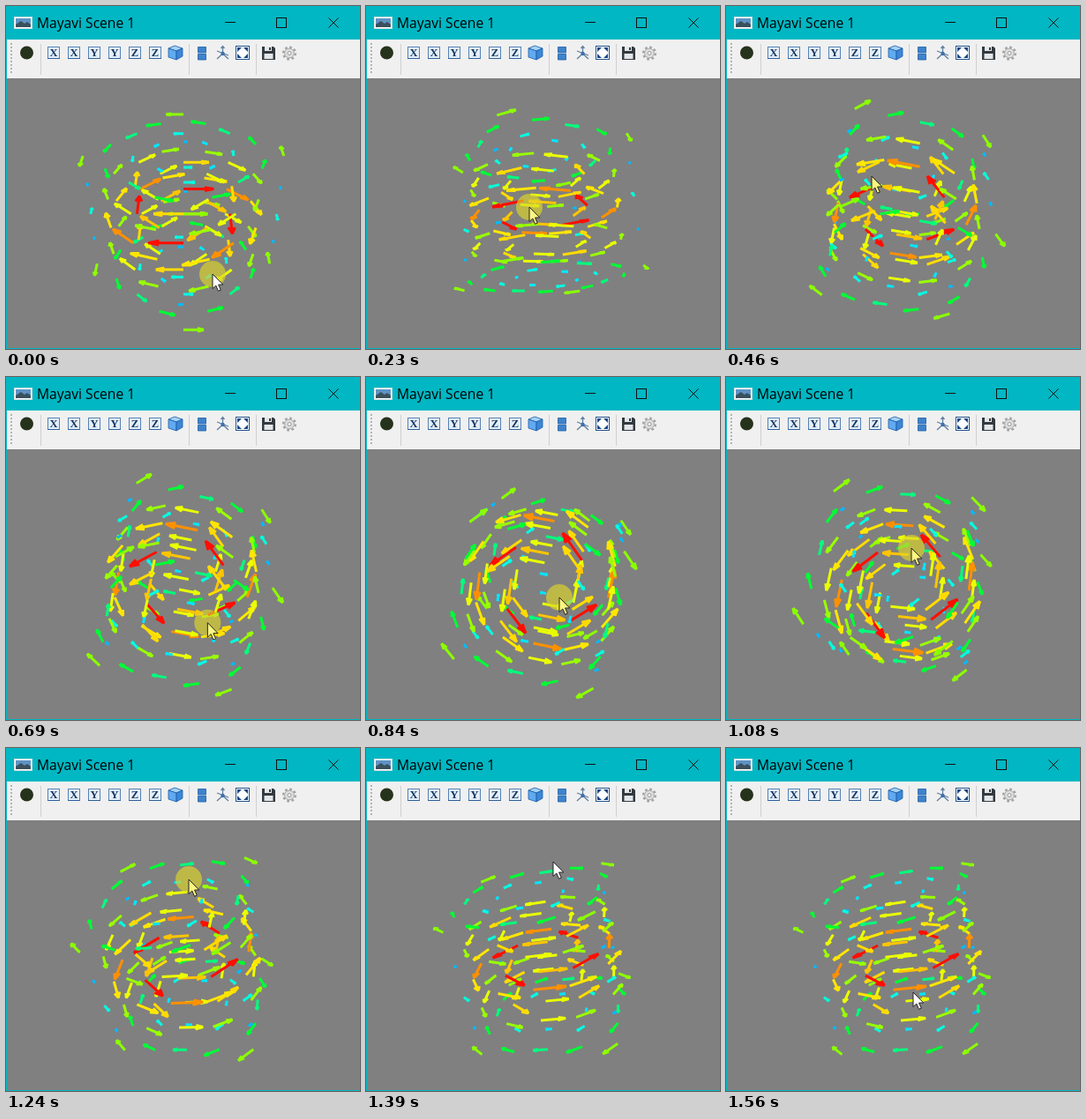
An HTML page with a canvas for the animation above (1.62 s loop, 401 by 389 pixels).

```html
<!DOCTYPE html>
<html lang="en">
<head>
<meta charset="utf-8">
<title>Mayavi Scene 1</title>
<style>
  html, body { margin: 0; width: 100%; height: 100%; overflow: hidden; }
  body { position: relative; background: #808080; }
  svg, canvas { position: absolute; left: 0; top: 0; display: block; }
  .title { font: 15.6px "Open Sans", "Noto Sans", sans-serif; fill: #000; }
  .axis { font: bold 12.5px "Liberation Serif", "Noto Serif", serif; fill: #16365f; text-anchor: middle; }
</style>
</head>
<body>
<canvas id="scene" width="401" height="389"></canvas>
<svg width="401" height="389" viewBox="0 0 401 389">
  <path fill="#00b7c3" d="M0 0H401V38H1V388H401V389H0Z"/>
  <path fill="#f0f0f0" d="M1 38H401V82H1Z"/>

  <g id="window-icon">
    <rect x="9.5" y="12.5" width="20" height="13" fill="#fff" stroke="#d5dde0"/>
    <rect x="11" y="14" width="17" height="10" fill="#5f93c4"/>
    <path fill="#39505c" d="M11 24V21L17 17 21 20 24 18 28 21V24Z"/>
  </g>
  <text class="title" x="35" y="25">Mayavi Scene 1</text>
  <g fill="none" stroke="#111">
    <path d="M248 18.5H260M365.500 13.500L376.500 24.500M376.500 13.500L365.500 24.500"/>
    <rect x="306.5" y="13.5" width="11" height="11"/>
  </g>

  <path stroke="#b4b4b4" stroke-width="2" stroke-dasharray="2 2" d="M6 42V78"/>
  <path stroke="#cfcfcf" d="M39.5 43V78M207.5 43V78M283.5 43V78"/>
  <circle cx="23.5" cy="53" r="7.5" fill="#26331c"/>
  <g id="axes"></g>

  <g stroke="#1c5da8" stroke-width=".8" stroke-linejoin="round">
    <path fill="#a4d2fa" d="M184 48L191 45 200 48 193 51Z"/>
    <path fill="#62aaf0" d="M184 48L193 51V61L184 58Z"/>
    <path fill="#3a86d8" d="M193 51L200 48V57L193 61Z"/>
    <rect x="217.5" y="46.5" width="9" height="6.5" fill="#3f83cc"/>
    <rect x="217.5" y="54.5" width="9" height="6.5" fill="#3f83cc"/>
  </g>

  <path fill="none" stroke="#5f7f9f" stroke-width="1.3"
    d="M245.500 46V54L239 60M245.500 54L252 60M239 51L252 56M243.500 48L245.500 45.500 247.500 48"/>
  <circle cx="245.5" cy="54" r="2.2" fill="#3c6fae"/>

  <rect x="260.5" y="45.5" width="15" height="15" fill="#fff" stroke="#23528c"/>
  <path fill="#17467f" d="M262 47H267L262 52ZM274 47V52L269 47ZM262 59V54L267 59ZM274 59H269L274 54Z"/>

  <path fill="#333a40" d="M290 46H303L305 48V61H290Z"/>
  <path fill="#e4e7ea" d="M293 46H301V51H293ZM292.500 54H302.500V60H292.500Z"/>
  <path fill="#333a40" d="M298 47H300V50H298Z"/>

  <circle cx="321" cy="53.5" r="6.8" fill="none" stroke="#a2a2a2" stroke-width="2.5" stroke-dasharray="2.67 2.67"/>
  <circle cx="321" cy="53.5" r="5.4" fill="#dedede" stroke="#a8a8a8"/>
  <circle cx="321" cy="53.5" r="2" fill="#f4f4f4" stroke="#999"/>
</svg>
<script>
  const LOOP = 1620, STEPS = 21;
  const CX = 201, CY = 235.8, FOCAL = 566, DIST = 15.22;
  const TURN_X = .5, TURN_Y = .684; // degrees per dragged pixel
  const ctx = document.getElementById('scene').getContext('2d');

  document.getElementById('axes').innerHTML = [...'XXYYZZ'].map((ch, i) => {
    const x = 54 + i * 23;
    return `<rect x="${x - 6.5}" y="46.5" width="13" height="13" fill="#e4effa" stroke="#5583b5"/>
      <path stroke="#2d5f9a" d="M${x - 7} 59.5H${x + 7}"/>
      <text class="axis" x="${x}" y="57">${ch}</text>`;
  }).join('');

  // Pointer path: two drags that turn the scene, each followed by a free move
  const PATH = [
    { step: 0, x: 234, y: 304, drag: true },
    { step: 3, x: 185, y: 228, drag: true },
    { step: 6, x: 165, y: 193 },
    { step: 8, x: 233, y: 293, drag: true },
    { step: 11, x: 219, y: 250, drag: true },
    { step: 14, x: 210, y: 194, drag: true },
    { step: 16, x: 207, y: 149, drag: true },
    { step: 18, x: 212, y: 129 },
    { step: 20, x: 212, y: 277 }
  ];

  // World axes as (right, up, towards viewer), seen isometrically
  const h = Math.SQRT1_2, s3 = Math.sqrt(1 / 3), s6 = Math.sqrt(1 / 6);
  const ISOMETRIC = [[-h, -s6, s3], [h, -s6, s3], [0, 2 * s6, s3]];

  // Trackball: the front of the scene follows the pointer
  function turn(axes, dx, dy) {
    const yaw = dx * TURN_X, pitch = -dy * TURN_Y;
    const size = Math.hypot(yaw, pitch);
    if (!size) return axes;
    const kx = -pitch / size, ky = yaw / size;
    const sin = Math.sin(size * Math.PI / 180), cos = Math.cos(size * Math.PI / 180);
    return axes.map(([x, y, n]) => {
      const along = (kx * x + ky * y) * (1 - cos);
      return [
        x * cos + ky * n * sin + kx * along,
        y * cos - kx * n * sin + ky * along,
        n * cos + (kx * y - ky * x) * sin
      ];
    });
  }

  function stateAt(step) {
    let axes = ISOMETRIC, x, y, drag;
    for (let i = 0; i < PATH.length - 1 && PATH[i].step <= step; i++) {
      const p = PATH[i], q = PATH[i + 1];
      const k = Math.min(1, (step - p.step) / (q.step - p.step));
      const dx = (q.x - p.x) * k, dy = (q.y - p.y) * k;
      x = p.x + dx;
      y = p.y + dy;
      drag = p.drag;
      if (drag) axes = turn(axes, dx, dy);
    }
    return { axes, x, y, drag };
  }

  // Blue-to-red hue ramp with square-root brightening
  function ramp(t) {
    const hue = 4 * (1 - t);
    const rgb = [Math.abs(hue - 3) - 1, 2 - Math.abs(hue - 2), 2 - Math.abs(hue - 4)];
    return `rgb(${rgb.map(c => Math.round(255 * Math.sqrt(Math.min(1, Math.max(0, c)))))})`;
  }

  // Swirling field on a 5 x 5 x 5 grid
  const arrows = [];
  for (let x = -2; x <= 2; x++)
    for (let y = -2; y <= 2; y++)
      for (let z = -2; z <= 2; z++) {
        if (!x && !y) continue;
        const r = Math.sqrt(x * x + y * y + z ** 4);
        const s = Math.sin(r) / (r + .001);
        const u = y * s, v = -x * s;
        const at = (along, side) => [x + along * u - side * v, y + along * v + side * u, z];
        arrows.push({
          points: [at(0, 0), at(1, 0), at(.7, -.1), at(.7, .1)],
          color: ramp(Math.hypot(u, v) / Math.sin(Math.SQRT2))
        });
      }

  function project(p, axes) {
    const [x, y, n] = [0, 1, 2].map(j => p[0] * axes[0][j] + p[1] * axes[1][j] + p[2] * axes[2][j]);
    const k = FOCAL / (DIST - n);
    return [CX + x * k, CY - y * k, n];
  }

  function drawArrow([tail, tip, left, right], color) {
    ctx.strokeStyle = ctx.fillStyle = color;
    ctx.beginPath();
    ctx.moveTo(tail[0], tail[1]);
    ctx.lineTo(tip[0], tip[1]);
    ctx.stroke();
    ctx.beginPath();
    ctx.moveTo(left[0], left[1]);
    ctx.lineTo(tip[0], tip[1]);
    ctx.lineTo(right[0], right[1]);
    ctx.fill();
    ctx.stroke();
  }

  const pointer = new Path2D('M0 0V16.5L3.8 13 6.5 19.3 9.3 18.1 6.6 12H11.8Z');

  function drawPointer(x, y, drag, lit) {
    if (drag) {
      ctx.fillStyle = 'rgba(222, 214, 40, .65)';
      ctx.beginPath();
      ctx.arc(x, y, 15, 0, 2 * Math.PI);
      ctx.fill();
    }
    ctx.save();
    ctx.translate(x, y);
    ctx.fillStyle = lit ? '#fbf582' : '#fff';
    ctx.strokeStyle = '#222';
    ctx.lineWidth = 1;
    ctx.fill(pointer);
    ctx.stroke(pointer);
    ctx.restore();
  }

  function draw(step) {
    const { axes, x, y, drag } = stateAt(step);
    ctx.fillStyle = '#808080';
    ctx.fillRect(0, 0, 401, 389);
    ctx.lineWidth = 3;
    ctx.lineJoin = 'bevel';
    arrows
      .map(({ points, color }) => ({ color, points: points.map(p => project(p, axes)) }))
      .sort((a, b) => a.points[0][2] + a.points[1][2] - b.points[0][2] - b.points[1][2])
      .forEach(({ points, color }) => drawArrow(points, color));
    drawPointer(x, y, drag, step > 0 && step < 18);
  }

  // The picture advances in even steps, slightly ahead of the beat
  const start = performance.now();
  function loop() {
    const t = (performance.now() - start) % LOOP;
    draw(Math.min(STEPS - 1, Math.floor(t / LOOP * STEPS + .16)));
    requestAnimationFrame(loop);
  }
  loop();
</script>
</body>
</html>
```
